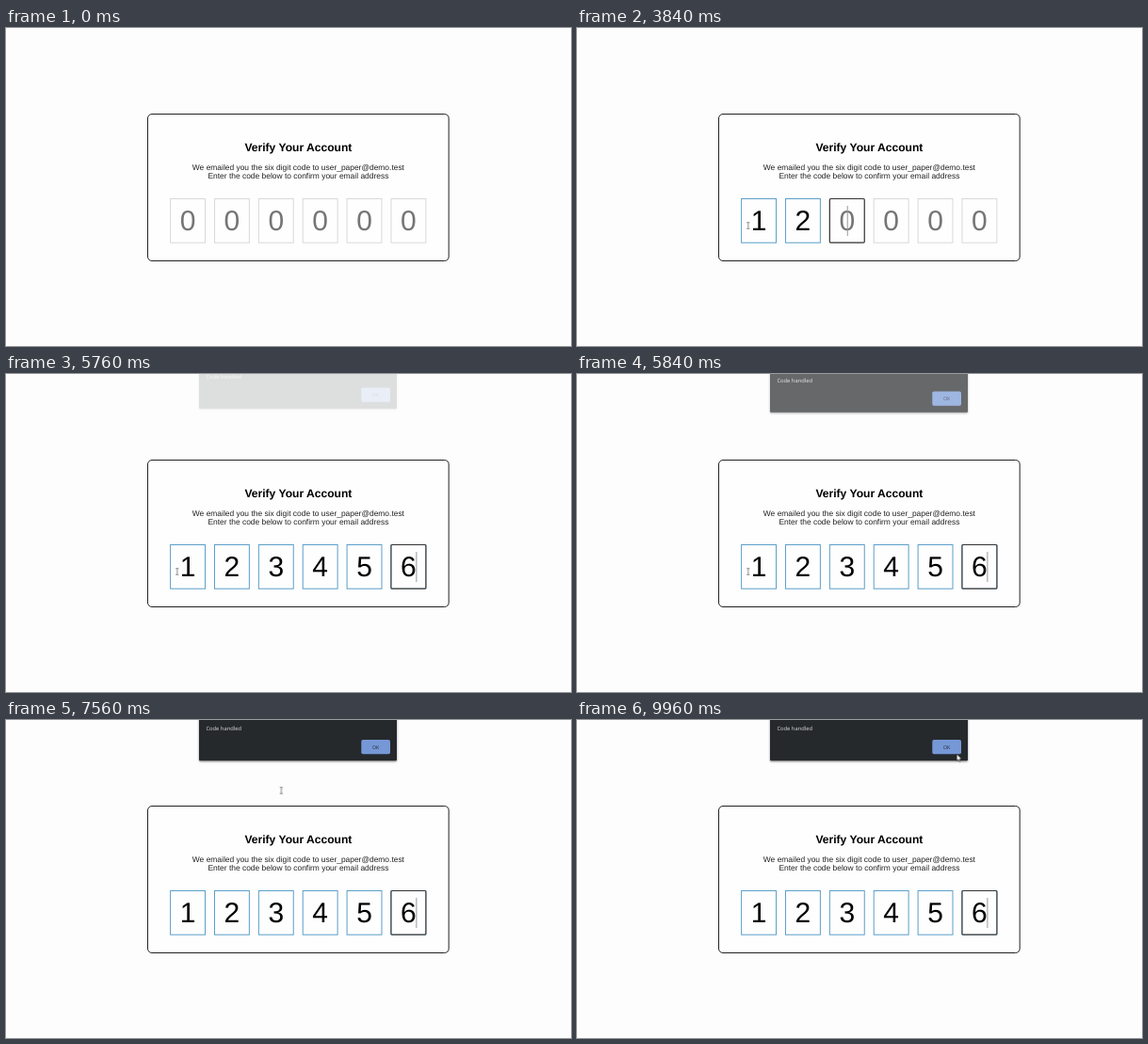
An HTML page that plays this animation: 600x338 px, repeating every 10000 ms.

```html
<!DOCTYPE html>
<html lang="en">
<head>
<meta charset="utf-8">
<title>Verify Your Account</title>
<style>
  html, body { margin: 0; width: 100%; height: 100%; overflow: hidden; background: #fdfdfd; }
  svg { display: block; width: 600px; height: 338px; }
  text { font-family: "Liberation Sans", Arial, sans-serif; text-anchor: middle; text-rendering: geometricPrecision; }
  .card { fill: #fefefe; stroke: #222; }
  .title { font-size: 12.1px; font-weight: bold; }
  .note { font-size: 8.44px; fill: #222; }

  /* --f: cell has focus, --v: cell holds its digit */
  .cell { --f: 0; --v: 0; animation: 10s step-end infinite; }
  .cell rect { fill: none; }
  .cell text { font-size: 30px; }
  .idle { stroke: #d9d9d9; opacity: calc(1 - var(--v)); }
  .done { stroke: #5b9fc9; opacity: var(--v); }
  .focus { opacity: var(--f); }
  .cell .back { fill: #fefefe; stroke: #333; stroke-width: 1.2; }
  .hint { fill: #757575; opacity: calc(1 - var(--v)); }
  .digit { opacity: var(--v); }
  .cell .caret { fill: #999; }
  .c1 { animation-name: c1; }
  .c2 { animation-name: c2; }
  .c3 { animation-name: c3; }
  .c4 { animation-name: c4; }
  .c5 { animation-name: c5; }
  .c6 { animation-name: c6; }
  .c1 .caret { animation: blink 10s step-end infinite; }
  .c6 .caret { animation: advance 10s step-end infinite; }
  @keyframes c1 { 0% { --f: 0; --v: 0 } 19.2% { --f: 1; --v: 0 } 34% { --f: 0; --v: 1 } to { --f: 0; --v: 1 } }
  @keyframes c2 { 0% { --f: 0; --v: 0 } 34% { --f: 1; --v: 0 } 38.4% { --f: 0; --v: 1 } to { --f: 0; --v: 1 } }
  @keyframes c3 { 0% { --f: 0; --v: 0 } 38.4% { --f: 1; --v: 0 } 42% { --f: 0; --v: 1 } to { --f: 0; --v: 1 } }
  @keyframes c4 { 0% { --f: 0; --v: 0 } 42% { --f: 1; --v: 0 } 47.2% { --f: 0; --v: 1 } to { --f: 0; --v: 1 } }
  @keyframes c5 { 0% { --f: 0; --v: 0 } 47.2% { --f: 1; --v: 0 } 52.4% { --f: 0; --v: 1 } to { --f: 0; --v: 1 } }
  @keyframes c6 { 0% { --f: 0; --v: 0 } 52.4% { --f: 1; --v: 0 } 56.4% { --f: 1; --v: 1 } to { --f: 1; --v: 1 } }
  @keyframes blink { 0% { opacity: 1 } 24.4% { opacity: 0 } 29.6%, to { opacity: 1 } }
  @keyframes advance { 0% { transform: none } 56.4%, to { transform: translateX(8px) } }

  .dialog { animation: drop 10s linear infinite; }
  .panel { fill: #26292c; filter: drop-shadow(0 1px 1.2px rgba(0, 0, 0, .45)); }
  .dialog text { font-family: "Open Sans", "Noto Sans", sans-serif; }
  .dialog .msg { font-size: 5.8px; fill: #dcdddf; text-anchor: start; }
  .dialog .ok { font-size: 5.3px; fill: #20293a; }
  .button { fill: #7698d6; }
  @keyframes drop {
    0%, 57.2% { opacity: 0; transform: translateY(-8px) }
    57.6% { opacity: .14; transform: translateY(-6.6px) }
    58.4% { opacity: .7; transform: translateY(-2.6px) }
    59.2% { opacity: .95; transform: translateY(-.6px) }
    60%, to { opacity: 1; transform: none }
  }

  .x { animation: x 10s linear infinite; }
  .y { animation: y 10s linear infinite; }
  .beam { fill: none; stroke: #555; stroke-width: .7; animation: beam 10s step-end infinite; }
  .arrow { fill: #fff; stroke: #000; stroke-width: .5; animation: arrow 10s step-end infinite; }
  @keyframes x {
    0%, 9.2% { transform: translateX(28px); animation-timing-function: ease-in-out }
    16.4%, 69.6% { transform: translateX(181.7px); animation-timing-function: cubic-bezier(.45, .1, .75, .7) }
    75.6% { transform: translateX(292px); animation-timing-function: cubic-bezier(.25, .3, .6, .9) }
    79.6% { transform: translateX(397px); animation-timing-function: ease-out }
    81.2%, to { transform: translateX(403.3px) }
  }
  @keyframes y {
    0%, 9.2% { transform: translateY(332px); animation-timing-function: ease-in-out }
    16.4%, 69.6% { transform: translateY(210px); animation-timing-function: cubic-bezier(.45, .1, .75, .8) }
    75.6% { transform: translateY(75px); animation-timing-function: cubic-bezier(.25, .4, .6, .9) }
    79.6% { transform: translateY(42.5px); animation-timing-function: ease-out }
    81.2%, to { transform: translateY(36.2px) }
  }
  @keyframes beam { 0% { opacity: 0 } 15.2% { opacity: 1 } 80%, to { opacity: 0 } }
  @keyframes arrow { 0% { opacity: 0 } 9.2% { opacity: 1 } 15.2% { opacity: 0 } 80%, to { opacity: 1 } }
</style>
</head>
<body>
<svg viewBox="0 0 600 338">
  <rect class="card" x="150.5" y="91.5" width="319.7" height="156" rx="4.5"/>
  <text class="title" x="310.4" y="130.6">Verify Your Account</text>
  <text class="note" x="310.4" y="150.5">We emailed you the six digit code to user_paper@demo.test</text>
  <text class="note" x="310.4" y="160.2">Enter the code below to confirm your email address</text>

  <g id="cells"></g>

  <g class="dialog">
    <rect class="panel" x="205" y="-10" width="210" height="53.3" rx="1"/>
    <text class="msg" x="212.4" y="11.4">Code handled</text>
    <rect class="button" x="377.3" y="21" width="30.7" height="15.3" rx="1.8"/>
    <text class="ok" x="392.6" y="30.5">OK</text>
  </g>

  <g class="x"><g class="y">
    <path class="beam" d="M-1.5-3.3H1.5M0-3.3V3.3M-1.5 3.3H1.5"/>
    <path class="arrow" d="M0 0V7.2L1.7 5.7 2.8 8.2 4 7.7 2.9 5.3H5.2Z"/>
  </g></g>
</svg>
<script>
  const box = (cls, rx = 0) =>
    `<rect class="${cls}" x="-18.4" y="181.5" width="36.9" height="46.7" rx="${rx}"/>`;

  const cell = n => `
    <g transform="translate(${193 + (n - 1) * 46.875})"><g class="cell c${n}">
      ${box("idle")}${box("done")}
      <g class="focus">${box("back", 1.2)}</g>
      <text class="hint" y="215.3">0</text>
      <text class="digit" y="215.3">${n}</text>
      <g class="focus"><rect class="caret" y="189" width="1" height="32"/></g>
    </g></g>`;

  document.getElementById("cells").innerHTML = [1, 2, 3, 4, 5, 6].map(cell).join("");
</script>
</body>
</html>
```
